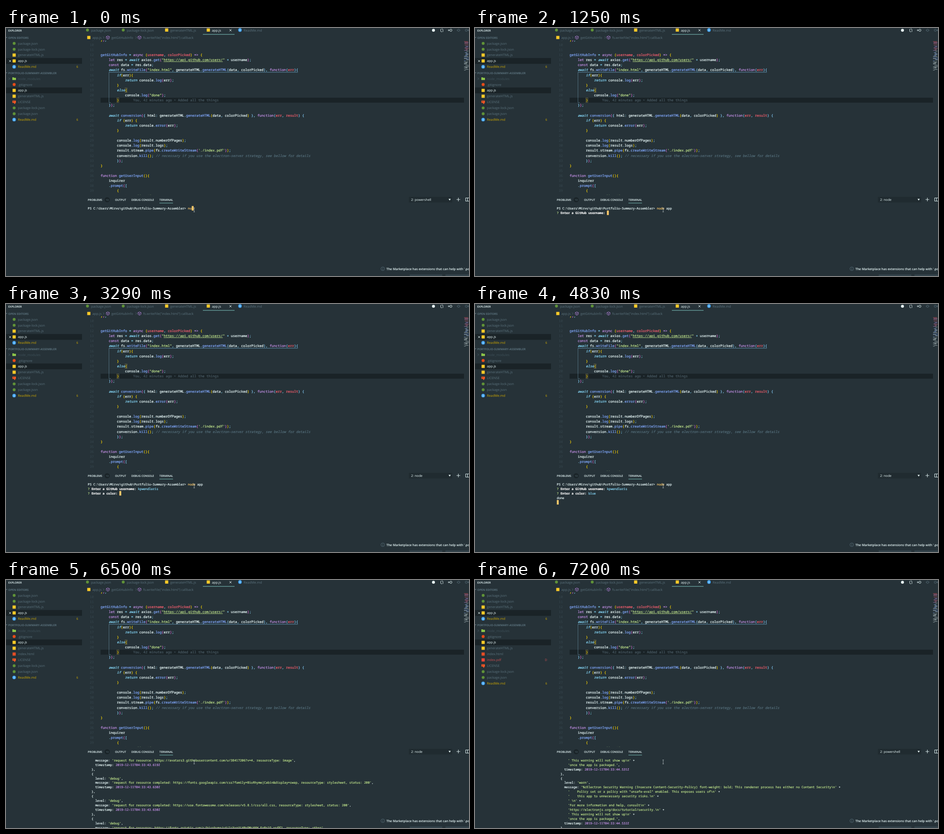
These frames come from a looping animation (1023x548 px, 8 s). An HTML page:

```html
<!DOCTYPE html>
<html lang="en">
<head>
<meta charset="utf-8">
<title>Editor and terminal</title>
<style>
html, body { margin: 0; width: 100%; height: 100%; overflow: hidden; background: #263238; }
svg { display: block; width: 100%; height: 100%; }
text { white-space: pre; text-rendering: geometricPrecision; font-family: "Open Sans", "Noto Sans", sans-serif; }
.code, .term { font-family: "Noto Sans Mono", "DejaVu Sans Mono", monospace; }
.code { font-size: 7.5px; font-weight: 500; stroke-width: .22px; }
.term { font-size: 6.833px; stroke-width: .2px; }
</style>
</head>
<body>
<svg id="stage" viewBox="0 0 1023 548" xmlns="http://www.w3.org/2000/svg">
  <defs>
    <clipPath id="editorClip"><rect x="175" y="27" width="840" height="341.5"/></clipPath>
    <clipPath id="termClip"><rect x="175" y="390" width="848" height="158"/></clipPath>
  </defs>
  <g id="chrome"></g>
  <g id="editor" clip-path="url(#editorClip)"></g>
  <g id="minimap"></g>
  <g id="tree"></g>
  <g id="terminal" clip-path="url(#termClip)"></g>
  <g id="shell"></g>
  <g id="overlay"></g>
</svg>
<script>
const LOOP = 8000;
const BG = '#263238', DARK = '#1a2327', GREY = '#5b727d', WHITE = '#eeffff';
const GREEN = '#5f9138', AMBER = '#ffca28', BLUE = '#42a5f5', WARN = '#cca700', RED = '#c74e52', TEAL = '#80cbc4';

// Each markup segment starts with "~" and one of these keys.
const INK = {
  w: WHITE, b: '#82aaff', c: '#89ddff', p: '#c792ea', r: '#fa6070', s: '#c3e88d', y: '#ffcb6b',
  g: '#ffd700', o: '#da70d6', l: '#87cefa', i: '#89ddff', m: '#546e7a', u: '#c3e88d', B: '#ffffff', d: '#4a5b64'
};
const EXTRA = {
  i: ' font-style="italic"', m: ' font-style="italic"',
  u: ' text-decoration="underline"', B: ' font-weight="700"'
};

const put = (id, html) => { document.getElementById(id).innerHTML = html; };
const esc = s => s.replace(/&/g, '&amp;').replace(/</g, '&lt;').replace(/>/g, '&gt;');
const rect = (x, y, w, h, fill, more = '') => `<rect x="${x}" y="${y}" width="${w}" height="${h}" fill="${fill}" ${more}/>`;
const dot = (x, y, r, fill, more = '') => `<circle cx="${x}" cy="${y}" r="${r}" fill="${fill}" ${more}/>`;
const stroke = (d, color, w = 0.8) => `<path d="${d}" fill="none" stroke="${color}" stroke-width="${w}"/>`;
// Labels are placed by their middle line.
const label = (x, y, s, fill = GREY, size = 7.25, more = '') =>
  `<text x="${x}" y="${y + 2.6}" font-size="${size}" fill="${fill}" ${more}>${esc(s)}</text>`;
// A thin stroke in the text colour thickens the small type.
const mono = (cls, x, y, markup) => {
  const parts = [...markup.matchAll(/~(.)([^~]*)/g)]
    .map(([, k, s]) => `<tspan fill="${INK[k]}" stroke="${INK[k]}"${EXTRA[k] || ''}>${esc(s)}</tspan>`);
  return `<text class="${cls}" x="${x}" y="${y}" xml:space="preserve">${parts.join('')}</text>`;
};

const square = (x, y, c) => rect(x - 3.5, y - 3.5, 7, 7, c);
const info = (x, y) => dot(x, y, 3.9, BLUE) + rect(x - 0.5, y - 0.7, 1, 2.9, '#fff') + rect(x - 0.5, y - 2.3, 1, 1, '#fff');
const cross = (x, y, r = 2.3) => stroke(`M${x - r} ${y - r}l${2 * r} ${2 * r}m0 ${-2 * r}l${-2 * r} ${2 * r}`, WHITE, 0.9);
const chevron = (x, y) => stroke(`M${x - 1.2} ${y - 2.4}l2.4 2.4l-2.4 2.4`, GREY, 0.7);
const cube = (x, y) => stroke(`M${x} ${y - 3.8}l3.4 1.8v3.9l-3.4 1.9l-3.4 -1.9v-3.9zm-3.4 1.8l3.4 1.8l3.4 -1.8m-3.4 1.8v3.9`, '#b180d7', 0.8);

function icon(name, x, y) {
  const ext = name.split('.').pop();
  switch (ext) {
    case 'json': return dot(x, y, 3.2, GREEN);
    case 'js': return square(x, y, AMBER);
    case 'md': return info(x, y);
    case 'html': return square(x, y, '#e44d26');
    case 'pdf': return square(x, y, '#f44336');
    case 'gitignore': return dot(x, y, 3.3, '#e64a19');
    case 'LICENSE': return rect(x - 3.8, y - 3.2, 7.6, 5, '#ff5722') + rect(x, y + 0.5, 2.4, 3.4, '#ff5722')
      + rect(x - 2.4, y - 1.6, 3, 0.7, BG);
    default: return `<path d="M${x - 4} ${y - 3}h3l1 1h4v5h-8z" fill="#8bc34a"/>`;
  }
}

function drawChrome() {
  const tab = (x, name, color) => icon(name, x, 4.5) + label(x + 8, 5, name, color);
  let h = tab(180, 'package.json') + tab(259, 'package-lock.json') + tab(355, 'generateHTML.js')
    + tab(447, 'app.js', WHITE) + cross(496, 5) + tab(517, 'ReadMe.md') + rect(435, 13.6, 70, 1, TEAL);

  h += icon('app.js', 183, 21) + label(191, 21, 'app.js') + chevron(215.5, 21) + cube(225, 21)
    + label(233, 21, 'getGitHubInfo') + chevron(287.5, 21) + cube(295, 21)
    + label(303, 21, 'fs.writeFile("index.html") callback');

  h += dot(944.5, 5, 3.2, WHITE)
    + stroke('M960.5 2v5q0 1.3 1.3 1.3h2M965.5 8.5v-5q0 -1.3 -1.3 -1.3h-2', WHITE)
    + dot(983, 5, 2.4, 'none', `stroke="${WHITE}" stroke-width=".9"`) + stroke('M980.6 5h-3.6m1.8 -2l-2 2l2 2', WHITE)
    + dot(1000, 5, 2.4, 'none', `stroke="${GREY}" stroke-width=".8"`) + stroke('M996 5h1.6m4.8 0h1.6', GREY)
    + dot(1017, 5, 2.4, 'none', `stroke="${GREY}" stroke-width=".8"`) + stroke('M1019.4 5h3.6m-1.8 -2l2 2l-2 2', GREY);

  const head = (x, s) => label(x, 379.5, s, WHITE, 6.05, 'font-weight="600"');
  h += head(180.8, 'PROBLEMS') + dot(223.5, 379.5, 5.6, DARK) + label(223.5, 379.5, '10', GREY, 5.8, 'text-anchor="middle"')
    + head(241, 'OUTPUT') + head(277, 'DEBUG CONSOLE') + head(339, 'TERMINAL') + rect(339, 386.4, 30, 0.9, TEAL);
  h += rect(890, 373, 96, 12.5, '#202b30') + '<path d="M977.8 377.5h5l-2.5 3.8z" fill="#eeffff"/>'
    + stroke('M995.5 379h8m-4 -4v8', WHITE, 0.9) + stroke('M1015.5 375.5h9v7h-9zm4 0v7', WHITE, 0.9);
  put('chrome', h);
}

const FIRST_LINE = 9;
const CODE = [
  '~g}~o)~c;', '', '',
  '~bgetGitHubInfo ~c= ~pasync ~g(~rusername~c, ~rcolorPicked~g) ~p=> ~g{',
  '~w    ~plet ~wres ~c= ~iawait ~waxios~c.~bget~o(~s"~uhttps://api.github.com/users/~s" ~c+ ~wusername~o)~c;',
  '~w    ~pconst ~wdata ~c= ~wres~c.~wdata~c;',
  '~w    ~iawait ~wfs~c.~bwriteFile~o(~s"index.html"~c, ~wgenerateHTML~c.~bgenerateHTML~l(~wdata~c, ~wcolorPicked~l)~c, ~pfunction~l(~rerr~l){',
  '~w        ~iif~g(~werr~g){',
  '~w            ~ireturn ~wconsole~c.~blog~o(~werr~o)~c;',
  '~w        ~g}',
  '~w        ~ielse~g{',
  '~w            ~wconsole~c.~blog~o(~s"done"~o)~c;',
  '~w        ~g}~d       You, 42 minutes ago • Added all the things',
  '~w    ~l}~o)~c;', '',
  '~w    ~iawait ~bconversion~o(~l{ ~whtml~c: ~wgenerateHTML~c.~bgenerateHTML~g(~wdata~c, ~wcolorPicked~g) ~l}~c, ~pfunction~l(~rerr~c, ~rresult~l) {',
  '~w        ~iif ~g(~werr~g) {',
  '~w            ~ireturn ~wconsole~c.~berror~o(~werr~o)~c;',
  '~w        ~g}', '',
  '~w        ~wconsole~c.~blog~g(~wresult~c.~wnumberOfPages~g)~c;',
  '~w        ~wconsole~c.~blog~g(~wresult~c.~wlogs~g)~c;',
  "~w        ~wresult~c.~wstream~c.~bpipe~g(~wfs~c.~bcreateWriteStream~o(~s'./index.pdf'~o)~g)~c;",
  '~w        ~wconversion~c.~bkill~g()~c; ~m// necessary if you use the electron-server strategy, see bellow for details',
  '~w        ~l}~o)~c;',
  '~g}', '',
  '~pfunction ~bgetUserInput~g(){',
  '~w    inquirer',
  '~w    ~c.~bprompt~o(~l[',
  '~w        ~g{',
  '~w            ~rtype~c: ~s"input"~c,'
];

function drawEditor() {
  const mid = n => 59.4 + (n - 12) * 11.125;
  const box = (x, n) => rect(x, mid(n) - 5, 4.6, 10, 'none', 'stroke="#8a8050" stroke-width=".6"');
  let h = rect(209, 154, 803, 11, DARK);
  CODE.forEach((line, i) => {
    const n = i + FIRST_LINE, y = mid(n) + 2.6;
    h += `<text class="code" x="194" y="${y}" text-anchor="end" fill="#37474f">${n}</text>`;
    if (line) h += mono('code', 209, y, line);
  });
  h += stroke('M645 97.8H227.5', INK.l, 0.6) + stroke('M227.5 97.8V164.6h4', '#6f99b3', 0.6)
    + box(262.9, 19) + box(244.9, 21);
  put('editor', h);
}

function drawMinimap() {
  let seed = 7;
  const rnd = () => (seed = (seed * 16807) % 2147483647) / 2147483647;
  let h = '';
  for (let y = 28; y < 94; y += 1.5) {
    if (rnd() < 0.18) continue;
    const c = y < 50 ? (rnd() < 0.6 ? INK.r : INK.p) : y < 72 ? (rnd() < 0.5 ? INK.b : INK.w) : INK.w;
    const x = 1012 + Math.floor(rnd() * 4) * (y < 38 ? 0.5 : 1.6);
    h += rect(x, y, 3 + rnd() * (1020 - x), 0.9, c, 'opacity=".6"');
  }
  put('minimap', h);
}

function drawOverlay() {
  const beam = stroke('M414.3 397.6h3m-1.5 0v8.8m-1.5 0h3', '#cfd8dc', 0.7);
  const note = dot(832.5, 532, 4, 'none', `stroke="${GREY}" stroke-width=".8"`)
    + rect(832.1, 531.2, 0.8, 3.2, GREY) + rect(832.1, 529.4, 0.8, 0.9, GREY)
    + label(840.5, 532, "The Marketplace has extensions that can help with '.pdf' files", WHITE, 6.95, 'font-weight="600"')
    + rect(892, 544.5, 72, 4, '#32424a') + rect(971, 544.5, 52, 4, '#32424a');
  put('overlay', beam + note);
}

const ROW = 12.92;
function drawTree(t) {
  const html = t >= 5510, fresh = t < 6350, pdf = t >= 7200;
  const head = (y, s) => label(5, y, s, GREY, 6.2, 'font-weight="700"')
    + `<path d="M0 ${y - 1}h3l-1.8 2.4z" fill="${GREY}"/>`;
  const badge = (y, s, c) => label(159.4, y, s, c, 7, 'text-anchor="end"');
  const file = (name, y) => {
    let color = GREY, tag = '', under = '';
    if (name === 'ReadMe.md') { color = WARN; tag = '6'; }
    if (name === 'node_modules') { color = '#3e5059'; under = chevron(7, y); }
    if (name === 'index.pdf' || (name === 'index.html' && fresh)) { color = RED; tag = 'D'; }
    if (name === 'app.js') { color = WHITE; under = rect(0, y - 6.4, 168, 12.8, DARK); }
    return under + icon(name, 18, y) + label(26.3, y, name, color) + (tag && badge(y, tag, color));
  };
  const list = (names, top) => names.map((n, i) => file(n, top + i * ROW)).join('');
  const files = ['node_modules', '.gitignore', 'app.js', 'generateHTML.js',
    ...(html ? ['index.html'] : []), ...(pdf ? ['index.pdf'] : []),
    'LICENSE', 'package-lock.json', 'package.json', 'ReadMe.md'];
  put('tree', label(5, 5, 'EXPLORER', WHITE, 6.05, 'font-weight="600"')
    + head(21, 'OPEN EDITORS')
    + list(['package.json', 'package-lock.json', 'generateHTML.js', 'app.js', 'ReadMe.md'], 34)
    + cross(9, 73) + head(99, 'PORTFOLIO-SUMMARY-ASSEMBLER') + list(files, 112));
}

const USER = 'kpwendlaris';
const PROMPT = String.raw`PS C:\Users\Mirvo\github\Portfolio-Summary-Assembler> `;
const ASK_USER = '? Enter a GitHub username: ', ASK_COLOR = '? Enter a color: ';

// Typing schedules: [time, characters shown].
const CMD_KEYS = [[0, 2], [120, 3], [270, 4], [390, 5], [540, 7], [690, 8]];
const USER_KEYS = [[1250, 0], [2000, 1], [2120, 2], [2270, 3], [2420, 4], [2570, 5], [2840, 8], [2990, 9], [3140, 11]];
const COLOR_KEYS = [[3290, 0], [4130, 1], [4280, 2], [4430, 4]];
const typed = (s, keys, t) => s.slice(0, keys.reduce((n, [at, len]) => t >= at ? len : n, 0));
const ask = (q, answer, done) => `~s?~B${q.slice(1)}~${done ? 'c' : 'w'}${answer}`;

// Colours strings and timestamps in logged objects.
const logged = s => '~w' + s.replace(/'[^']*'|\d{4}-\S+Z/g, m => (m[0] === "'" ? '~s' : '~p') + m + '~w');
const stamp = s => `    timestamp: 2019-12-11T04:33:${s}Z`;
const entry = (msg, time) => ['  {', "    level: 'debug',", `    message: 'request for resource${msg}',`, stamp(time), '  },'];
const WARN_END = [String.raw`      ' This warning will not show up\n' +`, "      'once the app is packaged.',"];

const DEBUG_LOG = [
  ...entry(': https://avatars3.githubusercontent.com/u/38417206?v=4, resourceType: image', '43.619').slice(2),
  ...entry(' completed: https://fonts.googleapis.com/css?family=BioRhyme|Cabin&display=swap, resourceType: stylesheet, status: 200', '43.630'),
  ...entry(' completed: https://use.fontawesome.com/releases/v5.8.1/css/all.css, resourceType: stylesheet, status: 200', '43.630'),
  ...entry(': https://fonts.gstatic.com/s/biorhyme/v4/1cXwaULHBpDMsHYW_ExBr1Q.woff2, resourceType: other', '43.630').slice(0, 3)
].map(logged);

const WARN_LOG = [
  ...WARN_END, stamp('44.531'), '  },', '  {', "    level: 'warn',",
  String.raw`    message: '%cElectron Security Warning (Insecure Content-Security-Policy) font-weight: bold; This renderer process has either no Content Security\n' +`,
  String.raw`      '    Policy set or a policy with "unsafe-eval" enabled. This exposes users of\n' +`,
  String.raw`      '    this app to unnecessary security risks.\n' +`,
  String.raw`      ' \n' +`,
  String.raw`      'For more information and help, consult\n' +`,
  String.raw`      'https://electronjs.org/docs/tutorial/security.\n' +`,
  ...WARN_END, stamp('44.532'), '  }'
].map(logged);

function terminalState(t) {
  if (t >= 6620) return { lines: WARN_LOG };
  if (t >= 6500) return { lines: DEBUG_LOG };
  const cmd = typed('node app', CMD_KEYS, t);
  const lines = [`~w${PROMPT}~y${cmd.slice(0, 4)}~w${cmd.slice(4)}`];
  if (t < 970) return { lines, row: 0, col: PROMPT.length + cmd.length };
  const redraw = t >= 2690 && t < 2840;
  if (t < 1250 || redraw) return { lines, row: 1, col: 0 };
  const user = typed(USER, USER_KEYS, t);
  lines.push(ask(ASK_USER, user, t >= 3290));
  if (t < 3290) return { lines, row: 1, col: ASK_USER.length + user.length };
  const color = typed('blue', COLOR_KEYS, t);
  lines.push(ask(ASK_COLOR, color, t >= 4710));
  if (t < 4710) return { lines, row: 2, col: ASK_COLOR.length + color.length };
  if (t < 4830) return { lines, row: 3, col: 0 };
  lines.push('~wdone');
  return { lines, row: 4, col: 0 };
}

function drawTerminal(t) {
  const X = 180.8, TOP = 393.4, LINE = 9.95, CHAR = 4.1;
  const { lines, row, col } = terminalState(t);
  let h = lines.map((s, i) => mono('term', X, TOP + 7.3 + i * LINE, s)).join('');
  if (row !== undefined) h += rect(X + col * CHAR, TOP + row * LINE, CHAR, LINE, INK.y);
  put('terminal', h);
  put('shell', label(895, 379.5, t >= 970 && t < 6770 ? '2: node' : '2: powershell', WHITE, 7.2, 'font-weight="500"'));
}

const CUTS = [2690, 970, 4710, 4830, 5510, 6350, 6500, 6620, 6770, 7200,
  ...[...CMD_KEYS, ...USER_KEYS, ...COLOR_KEYS].map(k => k[0])];
let shown = -1;
function render(t) {
  const cut = Math.max(...CUTS.filter(c => c <= t));
  if (cut === shown) return;
  shown = cut;
  drawTree(t);
  drawTerminal(t);
}

drawChrome();
drawEditor();
drawMinimap();
drawOverlay();
const start = performance.now();
function tick() {
  render((performance.now() - start) % LOOP);
  requestAnimationFrame(tick);
}
tick();
</script>
</body>
</html>
```
